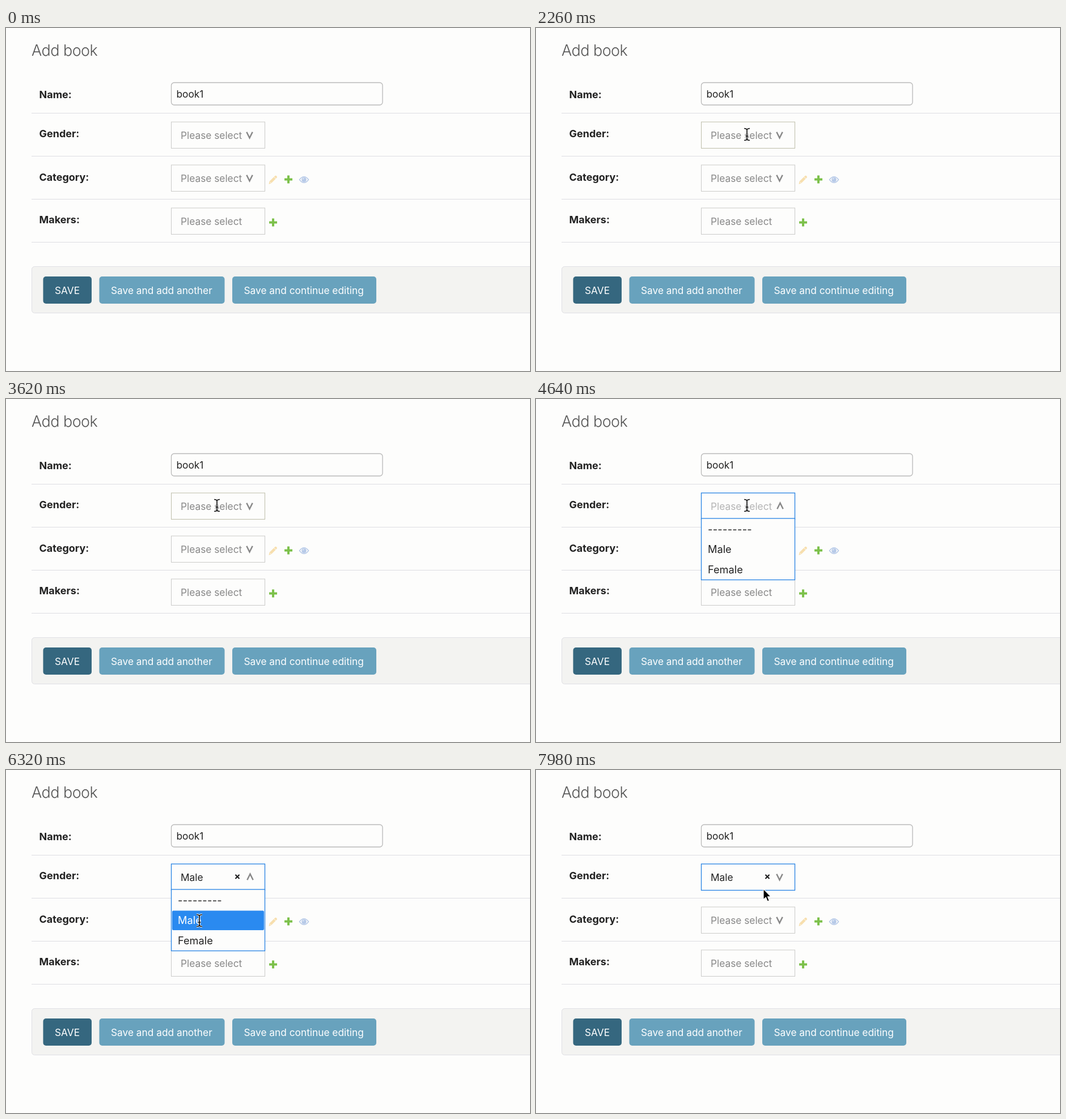
Write an HTML page that moves like this. It is 924 px wide and 606 px high and loops after 8000 ms.

```html
<!DOCTYPE html>
<html lang="en">
<head>
<meta charset="utf-8">
<title>Add book</title>
<style>
  html, body { margin: 0; width: 100%; height: 100%; overflow: hidden; background: #fdfdfc; }
  svg { display: block; width: 924px; height: 606px; }
  text { font: 17.3px Inter, Roboto, sans-serif; fill: #222; white-space: pre; }
  .title { font-size: 27px; font-weight: 300; letter-spacing: -.55px; fill: #555; }
  .label { font-size: 18px; font-weight: 700; }
  .hint { fill: #888; }
  .option { font-size: 18.2px; }
  .button { fill: #fff; }
  .box { fill: #fdfdfc; stroke: #cbcbc9; }
  .rule { stroke: #dddde2; }
  .chevron { fill: none; stroke: #888; stroke-width: 2.5; }
  .blue { stroke: #2582e4; stroke-width: 1.3; }
</style>
</head>
<body>
<svg viewBox="0 0 924 606">
  <defs>
    <path id="plus" d="M-7-2H-2V-7H2V-2H7V2H2V7H-2V2H-7Z" fill="#7dc14b"/>
    <path id="down" class="chevron" d="M-5.2-5.2L0 5.2L5.2-5.2"/>
  </defs>
  <g id="form"></g>

  <g transform="translate(470.5 268)">
    <path d="M-7 8L-6 3L3.5-6.5Q5-8 6.5-6.5L7-6Q8-5 7-3.5L-2.5 6Z" fill="#f7dfae"/>
    <path d="M-5 4L-3 6M2-5L6-1" stroke="#fdfdfc"/>
  </g>
  <use href="#plus" x="498" y="267.5"/>
  <use href="#plus" x="471" y="343.5"/>
  <g transform="translate(525.5 268)" fill="none" stroke="#b7cae8">
    <path d="M-8 0Q0-10.5 8 0Q0 10.5-8 0Z" stroke-width="1.5"/>
    <circle r="3.8" fill="#b7cae8"/>
    <path d="M-2-.5Q-2-2.3 0-2.3" stroke="#fdfdfc"/>
  </g>

  <rect id="gender" class="box" x="291.5" y="166" width="165" height="46.5"/>
  <text id="value" x="308" y="195.5"></text>
  <path id="clear" d="M404.5 185L411.5 192M411.5 185L404.5 192" stroke="#111" stroke-width="2"/>
  <use id="arrow" href="#down"/>

  <g id="menu">
    <rect class="box blue" x="291.5" y="211" width="165" height="108.5"/>
    <rect id="chosen" x="293" y="248.5" width="162" height="34.5" rx="2" fill="#2a8af0"/>
    <text class="option" x="303" y="237" letter-spacing=".3">---------</text>
    <text class="option" id="male" x="303" y="272">Male</text>
    <text class="option" x="303" y="307.5">Female</text>
  </g>

  <path id="pointer" d="M0 0V19L4.3 15L7.2 22L10.3 20.7L7.4 13.8H13.2Z" stroke="#fff" stroke-width="1.1"/>
  <g id="beam" fill="none">
    <path d="M-5-10.5Q0-10.5 0-7.5Q0-10.5 5-10.5M0-8V8M-5 10.5Q0 10.5 0 7.5Q0 10.5 5 10.5M-2.5 3H2.5" stroke="#fff" stroke-width="3.4"/>
    <path d="M-5-10.5Q0-10.5 0-7.5Q0-10.5 5-10.5M0-8V8M-5 10.5Q0 10.5 0 7.5Q0 10.5 5 10.5M-2.5 3H2.5" stroke="#111" stroke-width="1.7"/>
  </g>
</svg>
<script>
const $ = id => document.getElementById(id);
const text = (cls, x, y, s) => `<text class="${cls}" x="${x}" y="${y}">${s}</text>`;
const select = y => `<rect class="box" x="291.5" y="${y}" width="165" height="46.5"/>` +
  text('hint', 308, y + 29.5, 'Please select');
const button = (x, w, fill, s) =>
  `<rect x="${x}" y="439" width="${w}" height="48" rx="5" fill="${fill}"/>` + text('button', x + 20.5, 469.5, s);

$('form').innerHTML = [
  text('title', 45, 49, 'Add book'),
  ...[['Name:', 123.5], ['Gender:', 193], ['Category:', 269.5], ['Makers:', 345]]
    .map(([s, y]) => text('label', 58.5, y, s)),
  ...[150.5, 226.5, 302.5, 378.5].map(y => `<path class="rule" d="M45 ${y}H924"/>`),
  '<rect x="291.5" y="96.5" width="372.5" height="39.5" rx="5" fill="#fdfdfc" stroke="#b9b9b9" stroke-width="1.3"/>',
  text('', 300.5, 123, 'book1'),
  select(242), select(318),
  '<use href="#down" x="429.5" y="265"/>',
  '<rect x="45.5" y="421.5" width="900" height="82" rx="5" fill="#f3f3f1" stroke="#dfdfe4"/>',
  button(65.5, 85.5, '#35677f', 'SAVE'),
  button(164.5, 221, '#68a2bd', 'Save and add another'),
  button(399, 254, '#68a2bd', 'Save and continue editing')
].join('');

const LOOP = 8000, OPEN = 3900, PICK = 6050, CLOSE = 6900;
// Cursor path: time, x, y
const path = [
  [350, 420, 525], [700, 362, 240], [980, 358, 236], [1140, 350, 171], [1360, 346, 150],
  [1700, 366, 238], [1800, 368, 236], [2180, 372, 188], [4900, 372, 188],
  [5600, 341, 266], [6950, 341, 266], [7500, 401, 210], [8000, 401, 210]
];

function cursorAt(t) {
  const i = path.findIndex(p => p[0] > t);
  const [t0, x0, y0] = path[i - 1], [t1, x1, y1] = path[i];
  const k = (t - t0) / (t1 - t0), e = k * k * (3 - 2 * k);
  return [x0 + (x1 - x0) * e, y0 + (y1 - y0) * e];
}

const show = (id, on) => $(id).setAttribute('visibility', on ? 'visible' : 'hidden');
const place = (id, x, y, turn = 0) => $(id).setAttribute('transform', `translate(${x} ${y}) rotate(${turn})`);

function draw(t) {
  const open = t >= OPEN && t < CLOSE, picked = t >= PICK;
  const shown = t >= path[0][0];
  const [x, y] = shown ? cursorAt(t) : [0, 0];
  const overText = t < CLOSE && (Math.abs(y - 189) < 14 || open);
  const hover = shown && y > 166 && y < 212;

  $('gender').setAttribute('class', t >= OPEN ? 'box blue' : 'box');
  $('gender').style.stroke = hover && t > 1800 && t < OPEN ? '#bdbda9' : '';
  $('value').textContent = picked ? 'Male' : 'Please select';
  $('value').style.fill = picked ? '#222' : open ? '#b4b4b4' : '#888';
  $('male').style.fill = picked ? '#fff' : '';
  show('clear', picked);
  show('menu', open);
  $('chosen').style.display = picked ? '' : 'none';
  place('arrow', open ? 430.5 : 429.5, 189, open ? 180 : 0);
  show('pointer', shown && !overText);
  show('beam', shown && overText);
  place('pointer', x, y);
  place('beam', x, y);
}

function tick() {
  draw(performance.now() % LOOP);
  requestAnimationFrame(tick);
}
tick();
</script>
</body>
</html>
```
